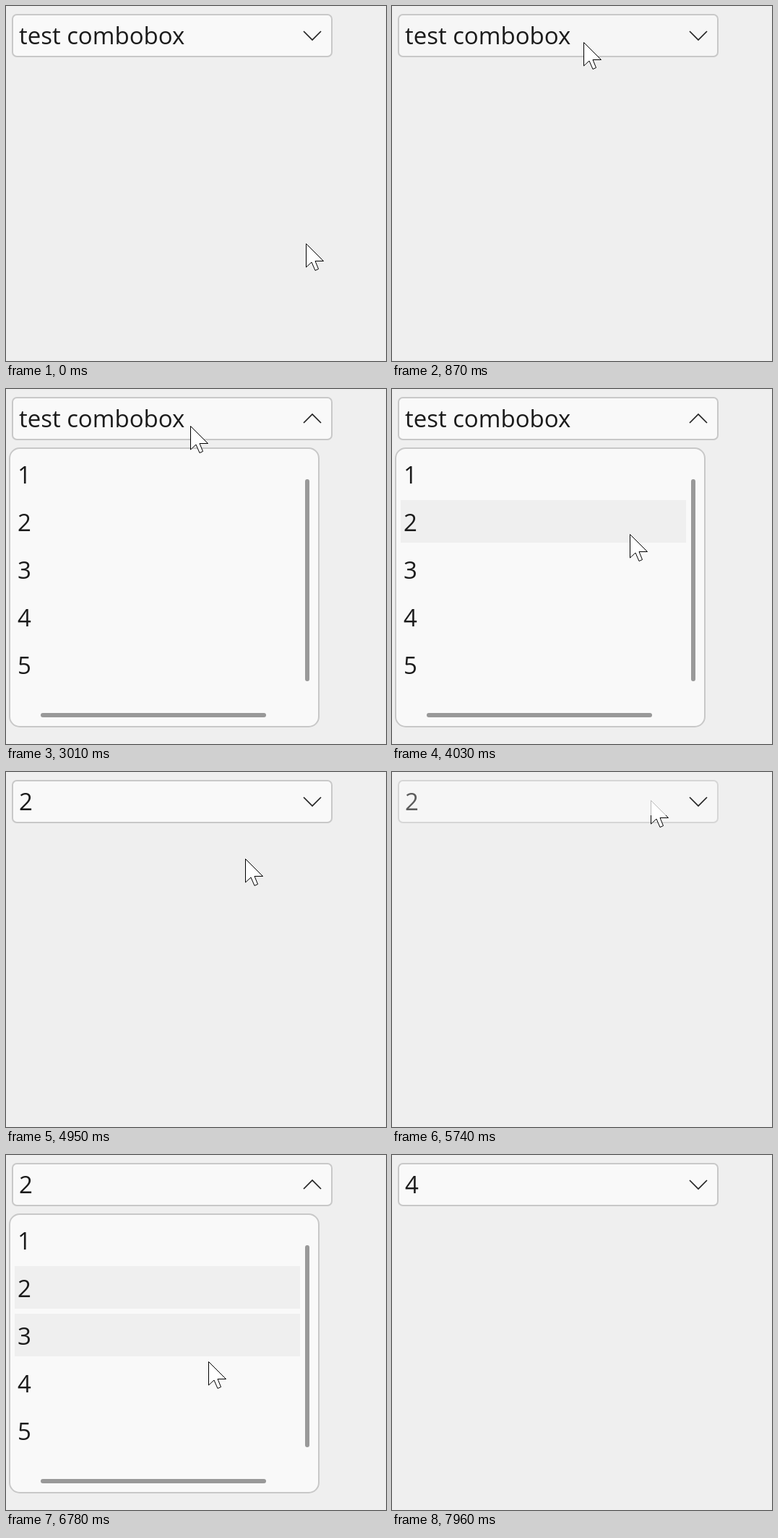
Animation of 526 by 492 pixels, one loop 8.46 s. Source, as an HTML page:

```html
<!DOCTYPE html>
<html lang="en">
<head>
<meta charset="utf-8">
<title>Combo box</title>
<style>
  html, body { margin: 0; width: 100%; height: 100%; overflow: hidden; background: #efefef; }
  svg { display: block; width: 526px; height: 492px; }
  text { font: 33px "Open Sans", "Noto Sans", sans-serif; fill: #1b1b1b; }
  .frame { fill: #f9f9f9; stroke: #c8c8c8; stroke-width: 2; }
  .bar { fill: #999; }
  .row { fill: #efefef; }
  #chevron { fill: none; stroke: #222; stroke-width: 1.7; }
  #box.hover .frame { fill: #f6f6f6; }
  #box.press .frame { fill: #f6f6f6; stroke: #d6d6d6; }
  #box.press text { fill: #5c5c5c; }
  #cursor { fill: #fff; stroke: #000; stroke-width: 1; }
  #cursor.pale { stroke: url(#pale); }
</style>
</head>
<body>
<svg viewBox="0 0 526 492">
  <defs>
    <linearGradient id="pale" gradientUnits="userSpaceOnUse" x1="0" y1="0" x2="0" y2="38">
      <stop offset=".54" stop-color="#bbb"/>
      <stop offset=".56" stop-color="#000"/>
    </linearGradient>
  </defs>
  <g id="box">
    <rect class="frame" x="9" y="12" width="442" height="58" rx="6"/>
    <text id="value" x="18" y="53">test combobox</text>
    <path id="chevron"/>
  </g>
  <g id="list">
    <rect class="frame" x="5" y="82" width="428" height="386" rx="14"/>
    <g id="rows"></g>
    <rect class="bar" x="414" y="125" width="6" height="280" rx="3"/>
    <rect class="bar" x="48" y="449" width="312" height="6" rx="3"/>
  </g>
  <path id="cursor" d="M.5 .5V33L8 26L13 37.5L17.5 35.5L13 24.5H24.5Z"/>
</svg>
<script>
const LOOP = 8460, TOP = 88, PITCH = 66;
const $ = id => document.getElementById(id);
const box = $('box'), value = $('value'), chevron = $('chevron');
const list = $('list'), cursor = $('cursor');

const linear = p => p;
const smooth = p => p * p * (3 - 2 * p);
const easeIn = p => p * p;
const easeOut = p => p * (2 - p);

// start, end, target x, target y, easing
const moves = [
  [260, 930, 262, 44, smooth],
  [1230, 1510, 246, 105, smooth],
  [1710, 1890, 255, 51, smooth],
  [3550, 4090, 332, 206, smooth],
  [4800, 4950, 331, 121, linear],
  [4950, 5240, 358, 39, easeOut],
  [6250, 6990, 261, 345, smooth],
  [7720, 7960, 540, 442, easeIn]
];

// press, fade in, shown, fade out, hidden, selected row, picked row
const popups = [
  [2220, 2820, 3010, 4390, 4500, 0, 2],
  [5740, 5830, 6020, 7250, 7350, 2, 4]
];

const rows = [1, 2, 3, 4, 5].map(n => {
  const y = TOP + (n - 1) * PITCH;
  $('rows').insertAdjacentHTML('beforeend',
    `<rect class="row" x="12" y="${y}" width="395" height="59"/>` +
    `<text x="16" y="${y + 43}">${n}</text>`);
  return $('rows').querySelector('rect:nth-last-of-type(1)');
});

const ramp = (t, a, b) => Math.min(1, Math.max(0, (t - a) / (b - a)));

function pointer(t) {
  let x = 415, y = 329;
  for (const [a, b, tx, ty, ease] of moves) {
    if (t < a) break;
    const p = ease(ramp(t, a, b));
    x += (tx - x) * p;
    y += (ty - y) * p;
  }
  return [x, y];
}

function draw(t) {
  const [x, y] = pointer(t);
  let picked = 0, selected = 0, alpha = 0, press = false, open = false;
  for (const [down, show, shown, hide, hidden, row, pick] of popups) {
    press ||= t >= down && t < show;
    open ||= t >= show && t < hide;
    if (t >= show && t < hidden) {
      alpha = ramp(t, show, shown) * (1 - ramp(t, hide, hidden));
      selected = row;
    }
    if (t >= hide) picked = pick;
  }
  const over = x > 8 && x < 452 && y > 11 && y < 71;
  const hovered = Math.floor((y - TOP) / PITCH) + 1;

  box.setAttribute('class', press ? 'press' : over && !open ? 'hover' : '');
  value.textContent = picked || 'test combobox';
  chevron.setAttribute('d', open ? 'M412 47L424 35L436 47' : 'M412 35L424 47L436 35');
  list.setAttribute('opacity', alpha);
  rows.forEach((r, i) => {
    const lit = i + 1 === selected || i + 1 === hovered;
    r.setAttribute('opacity', lit ? 1 : 0);
  });
  cursor.setAttribute('transform', `translate(${Math.round(x)} ${Math.round(y)})`);
  cursor.setAttribute('class', t >= 5740 && t < 6250 ? 'pale' : '');
  cursor.setAttribute('visibility', t < 7960 ? 'visible' : 'hidden');
}

const start = performance.now();
function tick() {
  draw((performance.now() - start) % LOOP);
  requestAnimationFrame(tick);
}
tick();
</script>
</body>
</html>
```
